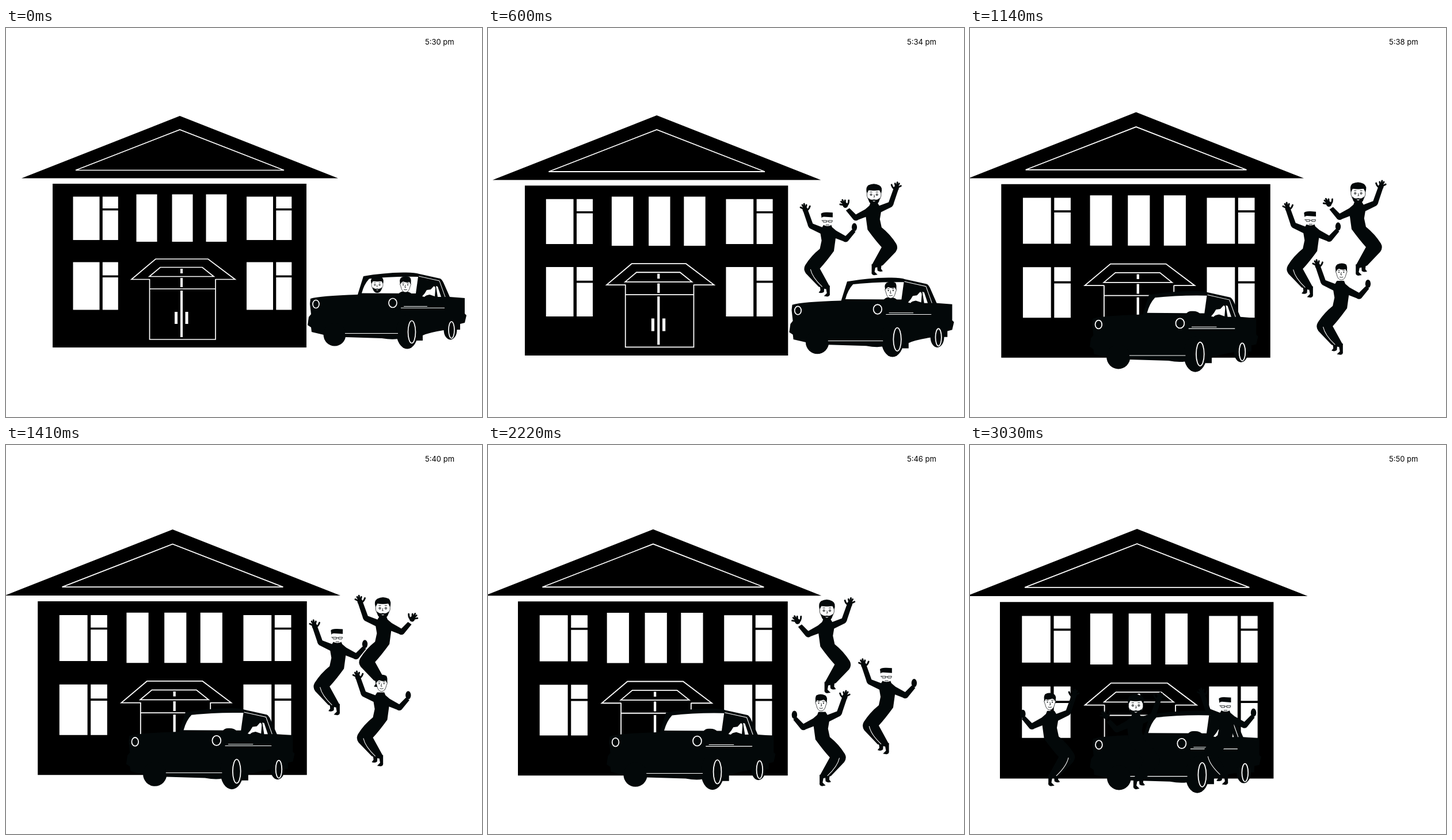
These frames come from a looping animation (827x677 px, 3300 ms). An HTML page:

```html
<!DOCTYPE html>
<html lang="en">
<head>
<meta charset="utf-8">
<title>House party</title>
<style>
  html, body { margin: 0; width: 100%; height: 100%; overflow: hidden; background: #fff; }
  svg { display: block; width: 100%; height: 100%; }
  .ink { fill: #030809; }
  .white { fill: #fff; }
  .line { fill: none; stroke: #fff; stroke-width: 1.7; }
  .thin { stroke-width: 1; }
  .fine { fill: none; stroke: #030809; stroke-width: .8; }
  .face { fill: #fff; stroke: #030809; stroke-width: .7; }
  .fingers { fill: none; stroke: #030809; stroke-width: 2.8; stroke-linecap: round; }
  text { font: 13px Inter, Roboto, sans-serif; }
</style>
</head>
<body>
<svg viewBox="0 0 827 677">
  <defs>
    <g id="hand">
      <path class="fingers" d="M0 0L-8-4M0 0L-5-8M0 0L-2-10M0 0L2-8M0 2Q6 1 8-6"/>
      <circle class="ink" r="4.5"/>
    </g>

    <g id="body">
      <path class="ink" d="M-42-16L-34-18L-25 7L-9 13L-6 8H6L8 13L15 19L31 28L42 17L48 21L35 37Q31 40 27 37L14 32L11 54
        Q-2 72 -13 84L4 115L-3 119L-15 115L-37 92Q-42 85 -38 78Q-28 62 -13 50L-10 36L-12 24L-30 15Q-33 13 -34 8Z"/>
      <path class="ink" d="M-13 112L-5 112L-6 124Q-10 127 -15 125L-12 121ZM-3 115L4 113V126Q5 131 0 132L-6 131L-1 126Z"/>
      <use href="#hand" x="-38" y="-17"/>
    </g>
    <g id="dancer">
      <use href="#body"/>
      <ellipse class="ink" cx="46" cy="13" rx="4.5" ry="7"/>
      <path class="line thin" d="M-29 85Q-26 99 -9 115"/>
    </g>

    <g id="glassesHead">
      <path class="white" d="M-9-6H9V5Q8 11 0 11Q-8 11 -9 5Z"/>
      <path class="ink" d="M-10-3L-11-10Q-9-13 0-12.5L9-12V-4L-6-5Q-9-5-10-3Z"/>
      <path class="fine" d="M-8 1.5H-1.5V4.5H-7ZM2 1.5H8.5L7.5 4.5H2ZM-1.5 2.5H2M-10 1.5H-8M-3 9H3"/>
    </g>

    <g id="beardHead">
      <path class="face" d="M-12-8H12V2Q10 13 0 13Q-10 13-12 2Z"/>
      <path class="ink" d="M-12-2Q-16-12-9-16Q0-21 10-16Q15-11 12-2L9-8Q0-6-9-8Z"/>
      <path class="ink" d="M-10 5Q-6 10 0 8Q6 10 10 5Q9 17 0 17Q-9 17-10 5Z"/>
      <path class="white" d="M-3 10.5H3L0 12Z"/>
      <path class="fine" d="M-7-4.5H-3M3-4.5H7M0 0L-1 4H1"/>
      <g class="fine"><circle cx="-5" r="1.6"/><circle cx="5" r="1.6"/></g>
      <g class="ink"><circle cx="-5" r=".7"/><circle cx="5" r=".7"/></g>
    </g>

    <g id="quiffHead">
      <path class="face" d="M-8.5-6L-9.5-1L-8 3Q-6 13 0 13Q6 13 8 3L9.5-1L8.5-6Z"/>
      <path class="ink" d="M-8.5-1Q-12-9-7-13Q1-17 8-13Q11-8 8.5-1L7-5Q1-3-4-6L-7-4Z"/>
      <path class="fine" d="M-6-3H-2M2-3H6M0 0L-1 4.5H1M-3 8Q0 9.5 3 8"/>
      <g class="ink"><circle cx="-4" r="1"/><circle cx="4" r="1"/></g>
    </g>
  </defs>

  <rect width="827" height="677" fill="#fff"/>
  <text id="clock" x="728" y="28.5"></text>

  <g id="scene">
    <path d="M27 261.5L302 153L577 261.5ZM81 271H522V556H81Z"/>
    <path class="line" d="M121 247.5L302 177L483 247.5Z"/>
    <path id="panes" class="white"/>
    <path class="line" d="M249.5 437.5H218L260 402H351L398 437.5H364M249 432.5L268 416.5H341L361 432.5Z"/>
    <path class="line" d="M249.5 437V542H364V437M249.5 454H364"/>
    <path class="white" d="M303 419h4v8h-4zM303 435h4v16h-4zM303 457h4v81h-4zM293 494h5v21h-5zM311.5 494h5v21h-5z"/>

    <g id="car">
      <path class="ink" d="M529 471Q545 466 611 464L621 432Q655 426 690 425.5Q710 425 718 428L754 436Q757 437 760 443L771 468L797 470
        V497L800 500L797 513L789 515V525H780L760 526Q735 530 724 535V544H714L681 541Q670 543 653 540L590 538L552 534L531 529
        L530 521L524 517L526 503L530 498L528 480Z"/>
      <g class="ink">
        <ellipse cx="571" cy="533.5" rx="19.5" ry="20"/>
        <ellipse cx="697" cy="529" rx="19" ry="29.5"/>
        <ellipse cx="772" cy="525" rx="11.5" ry="17.5"/>
      </g>
      <path class="white" d="M618 461.5Q622 446 631 436.5Q670 432 716 433L712 462Z"/>
      <path class="ink" d="M682 463Q685 458 692 458.5Q701 458 705 463Z"/>
      <use id="rider" href="#beardHead" transform="translate(645 447) scale(.82)"/>
      <use id="driver" href="#quiffHead" transform="translate(694 447)"/>
      <path class="white" d="M723 467Q728 462 731 456L738 455L743 449.5Q746 449 746 454L745 467L736 464Q729 465 727 468Z"/>
      <path class="white" d="M747 449L750 450L756 468H750Z"/>
      <path class="line thin" d="M717 432L753 440L763 468M691 484.5H732M686 487.2H762M589 531.5H681"/>
      <g class="line">
        <ellipse cx="538.5" cy="480.5" rx="5.5" ry="7"/>
        <ellipse cx="672" cy="478.5" rx="7" ry="8"/>
        <ellipse cx="705" cy="529" rx="6.5" ry="19.5"/>
        <ellipse cx="774" cy="525.5" rx="5" ry="14.5"/>
      </g>
    </g>

    <g id="bearded">
      <use href="#body"/>
      <use href="#hand" transform="translate(49 12) scale(-1 1) rotate(-18)"/>
      <use href="#beardHead" y="-6"/>
    </g>
    <g id="quiffed">
      <use href="#dancer"/>
      <use href="#quiffHead" x="1.5" y="-6.5"/>
    </g>
    <g id="bespectacled">
      <use href="#dancer"/>
      <use href="#glassesHead"/>
    </g>
  </g>
</svg>
<script>
const $ = id => document.getElementById(id);
const LOOP = 3300, FIRST = 330, STEP = 270, LAST = 11;
const CAR_MOVES = 3, DRIVER_OUT = 4, BODY_SIZE = .98;

const pane = (x, y, w, h) => `M${x} ${y}h${w}v${h}h${-w}z`;
let panes = [226.5, 288.5, 347.5].map(x => pane(x, 289.5, 36, 82.5)).join('');
for (const x of [116.5, 418])
  for (const [y, top, h] of [[293.5, 20.5, 75.5], [407.5, 23, 83]])
    panes += pane(x, y, 46, h) + pane(x + 51.3, y, 27, top) + pane(x + 51.3, y + top + 3.5, 27, h - top - 3.5);
$('panes').setAttribute('d', panes);

// Key points are [step, ...values]; steps between them are interpolated.
function at(keys, step) {
  const next = keys.find(k => k[0] >= step) || keys[keys.length - 1];
  const prev = keys[Math.max(0, keys.indexOf(next) - 1)];
  const p = next === prev ? 1 : Math.min(1, (step - prev[0]) / (next[0] - prev[0]));
  return next.slice(1).map((v, i) => prev[i + 1] + (v - prev[i + 1]) * p);
}

// x, y, zoom of the whole scene
const camera = [[0, 81, 153, 1], [2, 64, 152, 1.037], [3, 67, 152, 1.0285],
  [4, 54.3, 146.6, 1.06], [6, 56, 147.3, 1.0605], [8, 52, 146.8, 1.063], [9, 52, 146, 1.078]];

// x, y, facing of each dancer, in scene units
const dancers = [
  { id: 'bespectacled', out: 1, keys: [[4, 588, 328, 1], [6, 556, 329, -1], [8, 683.5, 392, 1], [LAST, 444.6, 437, 1]] },
  { id: 'bearded', out: 2, keys: [[4, 666, 292, -1], [6, 627, 284.5, 1], [8, 586, 292, -1], [LAST, 300, 444, -1]] },
  { id: 'quiffed', out: DRIVER_OUT, keys: [[4, 637, 422, 1], [6, 649, 403, -1], [8, 578, 444, -1], [LAST, 163, 439, -1]] }
];

const show = (id, on) => $(id).setAttribute('visibility', on ? 'visible' : 'hidden');
const transform = (id, value) => $(id).setAttribute('transform', value);

function draw(step) {
  const [x, y, zoom] = at(camera, step);
  transform('scene', `translate(${x} ${y}) scale(${zoom}) translate(-81 -153)`);
  transform('car', step < CAR_MOVES ? '' : 'translate(-298 21)');
  show('rider', step < 2);
  show('driver', step < DRIVER_OUT);
  $('clock').textContent = `5:${Math.min(30 + 2 * step, 50)} pm`;
  for (const { id, out, keys } of dancers) {
    const [dx, dy, facing] = at(keys, step);
    show(id, step >= out);
    transform(id, `translate(${dx} ${dy}) scale(${facing < 0 ? -BODY_SIZE : BODY_SIZE} ${BODY_SIZE})`);
  }
}

let shown = -1;
function tick() {
  const t = performance.now() % LOOP;
  const step = t < FIRST ? 0 : Math.min(LAST, 1 + Math.floor((t - FIRST) / STEP));
  if (step !== shown) draw(shown = step);
  requestAnimationFrame(tick);
}
tick();
</script>
</body>
</html>
```
